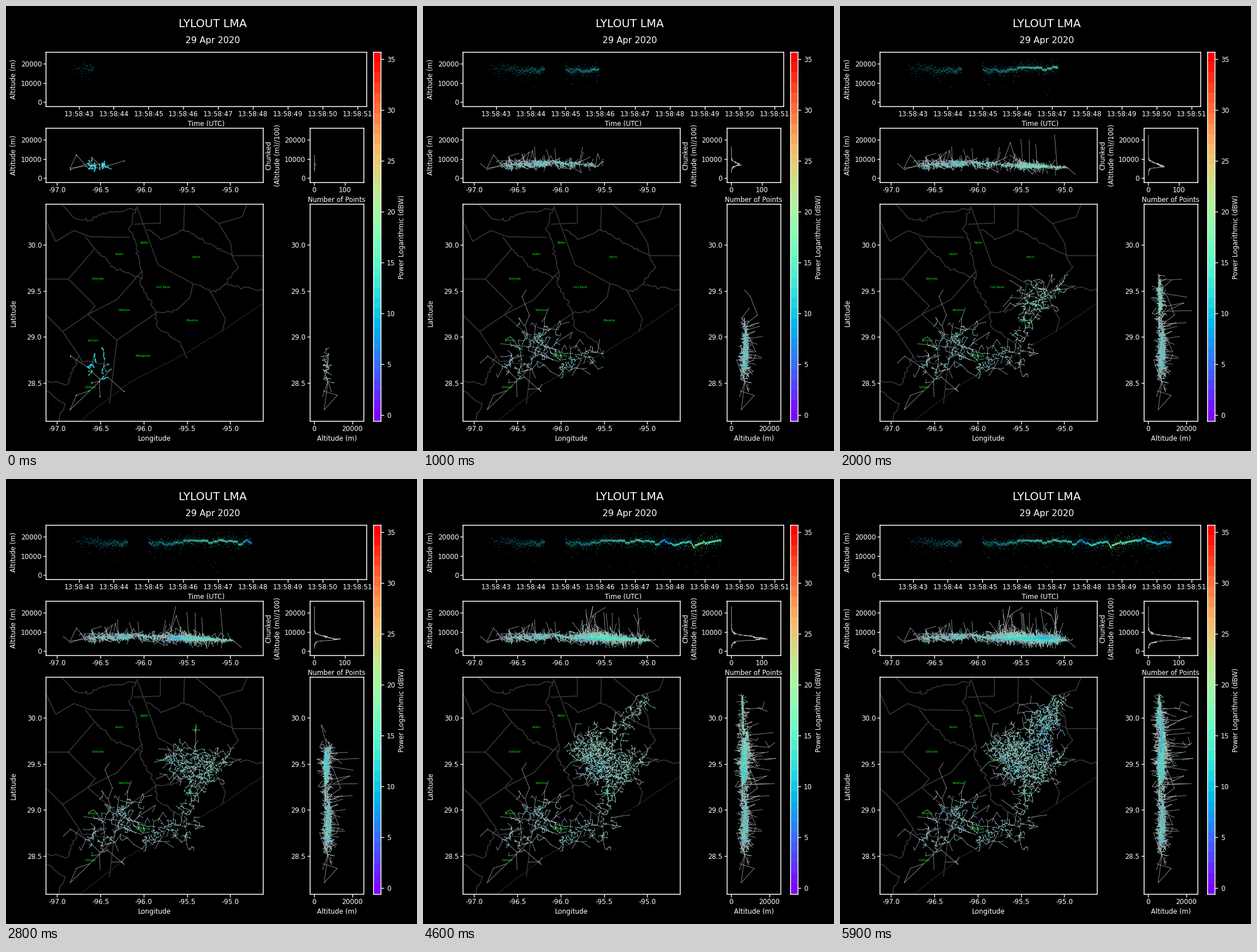
A matplotlib script for the animation above (6000 ms loop, 719 by 779 pixels).

```python
import numpy as np
import matplotlib.pyplot as plt
from matplotlib.animation import FuncAnimation

W, H, DPI = 719, 779, 64
FRAMES, PER_FRAME = 60, 62
N = FRAMES * PER_FRAME
rng = np.random.default_rng(29)


def px(size):
    """Pixels to points."""
    return size * 72 / DPI


TEXT = 35 / 3
plt.style.use("dark_background")
plt.rcParams.update({
    "font.family": "DejaVu Sans",
    "font.size": px(TEXT),
    "axes.linewidth": px(1.5),
    "axes.labelpad": px(3.9),
    "path.simplify": False,
})
for axis in ("xtick", "ytick"):
    plt.rcParams.update({
        f"{axis}.major.size": px(5),
        f"{axis}.major.width": px(1.4),
        f"{axis}.major.pad": px(2.4),
        f"{axis}.labelsize": px(TEXT),
    })

fig = plt.figure(figsize=(W / DPI, H / DPI), dpi=DPI, facecolor="black")


# Stage pixels to data units
def lon(x):
    return -97 + (np.asarray(x) - 89.3) / 151.5


def lat(y):
    return 30 - (np.asarray(y) - 418.5) / 161


def sec(x):
    return 43 + (np.asarray(x) - 127.5) / 60.9


def panel(x0, y0, x1, y1, xlim, ylim):
    ax = fig.add_axes([x0 / W, 1 - y1 / H, (x1 - x0) / W, (y1 - y0) / H],
                      facecolor="black")
    ax.set(xlim=xlim, ylim=ylim)
    return ax


def caption(x, y, text, size=TEXT, **kw):
    fig.text(x / W, 1 - y / H, text, size=px(size), color="white",
             ha="center", linespacing=1.15, **kw)


# Panels
ALT = (-2260, 26165)
LON = lon([70, 450])
LAT = lat([726.5, 347])
time_ax = panel(70, 81, 630.5, 175.5, sec([70, 630.5]), ALT)
lon_ax = panel(70, 214, 450, 308.5, LON, ALT)
count_ax = panel(531.5, 214, 626, 308.5, (-14, 162), ALT)
map_ax = panel(70, 347, 450, 726.5, LON, LAT)
lat_ax = panel(531.5, 347, 626, 726.5, (-2340, 26000), LAT)
bar_ax = panel(642.5, 81, 655.5, 726.5, (0, 1), (-0.6, 35.7))

for ax in (time_ax, lon_ax, count_ax):
    ax.set_yticks([0, 10000, 20000])
for ax in (lon_ax, map_ax):
    ticks = np.arange(-97, -94.9, 0.5)
    ax.set_xticks(ticks, [f"{t:.1f}" for t in ticks])
for ax in (map_ax, lat_ax):
    ticks = np.arange(28.5, 30.1, 0.5)
    ax.set_yticks(ticks, [f"{t:.1f}" for t in ticks])
time_ax.set_xticks(range(43, 52), [f"13:58:{s}" for s in range(43, 52)])
count_ax.set_xticks([0, 100])
lat_ax.set_xticks([0, 20000])

time_ax.set_xlabel("Time (UTC)")
count_ax.set_xlabel("Number of Points")
map_ax.set_xlabel("Longitude")
lat_ax.set_xlabel("Altitude (m)")
caption(361.5, 37, "LYLOUT LMA", TEXT * 5 / 3)
caption(361.5, 64.5, "29 Apr 2020", TEXT * 4 / 3)
for x, y, text in [(13, 128, "Altitude (m)"), (13, 261, "Altitude (m)"),
                   (13, 537, "Latitude"),
                   (467.5, 261.5, "Chunked\n(Altitude (m)//100)"),
                   (692.5, 404, "Power Logarithmic (dBW)")]:
    caption(x, y, text, rotation=90, va="center")

bar_ax.imshow(np.arange(36)[:, None], cmap="rainbow", aspect="auto",
              origin="lower", extent=(0, 1, -0.6, 35.7))
bar_ax.yaxis.tick_right()
bar_ax.tick_params(axis="y", pad=px(5.5))
bar_ax.set_xticks([])
bar_ax.set_yticks(range(0, 36, 5))


# County map
def border(*points, color="#3a3a3a", width=1.5):
    x, y = np.array(points, float).T
    map_ax.plot(lon(x), lat(y), color=color, lw=px(width), zorder=1)


def river(*points, rough=1.3, **style):
    """A border that wiggles between its key points."""
    pts = np.array(points, float)
    run = np.r_[0, np.hypot(*np.diff(pts, axis=0).T).cumsum()]
    at = np.linspace(0, run[-1], int(run[-1] / 4))
    bend = np.column_stack([np.interp(at, run, c) for c in pts.T])
    bend[1:-1] += rng.normal(0, rough, bend[1:-1].shape)
    border(*bend, **style)


border((70, 376), (87, 412), (119, 393), (148, 404), (216, 405))
border((270, 347), (270, 380), (224, 382))
border((229, 351), (266, 453), (327, 486), (322, 510), (299, 532))
border((312, 347), (311, 392))
border((331, 347), (372, 381), (393, 415), (396, 437), (450, 437))
border((372, 381), (413, 369), (422, 347))
border((356, 497), (384, 548), (378, 570))
border((181, 696), (194, 585), (143, 540), (194, 514), (238, 464))
border((194, 585), (263, 537))
border((70, 478), (109, 478), (156, 525), (143, 540), (99, 570), (70, 541))
border((109, 478), (155, 425), (139, 404))
border((99, 570), (127, 611))
river((98, 347), (120, 373), (148, 374), (165, 364), (228, 354))
river((228, 354), (216, 387), (228, 420), (237, 467), (235, 487), (263, 537))
river((299, 532), (263, 537), (263, 560), (305, 590), (317, 617))
river((247, 392), (275, 408), (311, 392), (370, 425), (396, 437), (405, 457),
      (385, 487), (366, 500), (327, 486))
river((385, 487), (450, 499))
river((155, 425), (186, 456), (238, 478))
river((127, 611), (133, 621), (181, 627))
river((127, 611), (108, 662), (70, 656))
river((70, 675), (104, 698), (92, 726))
river((450, 520), (378, 569), (318, 606), (215, 660), (130, 726), rough=0.4,
      color="#252525", width=1.2)

for x, y, name in [(243, 415, "Waller"), (199, 435, "Austin"),
                   (333, 440, "Harris"), (161, 478, "Colorado"),
                   (275, 493, "Fort Bend"), (207, 533, "Wharton"),
                   (326, 551, "Brazoria"), (153, 585.5, "Jackson"),
                   (240, 612.5, "Matagorda"), (148, 668, "Calhoun")]:
    map_ax.text(lon(x), lat(y), name, color="lime", size=px(TEXT * 5 / 12),
                ha="center", va="center", zorder=1.5)

# Flash front on the stage: frame, x, y, radius
ROUTE = np.array([
    (0, 155, 648, 18), (2, 190, 605, 20), (4, 228, 598, 18),
    (6, 185, 568, 20), (8, 250, 620, 11), (11, 308, 615, 14),
    (13, 325, 550, 9), (15, 350, 505, 14), (17, 320, 525, 15),
    (20, 382, 490, 9), (22, 340, 490, 18), (26, 290, 488, 10),
    (30, 320, 522, 18), (33, 272, 475, 11), (36, 300, 452, 14),
    (41, 320, 495, 24), (43, 337, 445, 8), (46, 385, 388, 5),
    (49, 345, 422, 14), (53, 378, 430, 6), (56, 330, 465, 20),
    (59, 362, 470, 7)], float)

# Sources come as short wandering leaders, mixed with lone scattered ones
step = np.arange(N) / PER_FRAME
batch = step.astype(int)
lone = rng.random(N) < 0.27
spots = np.zeros((N, 2))
for i in range(N):
    x, y, radius = (np.interp(batch[i], ROUTE[:, 0], c)
                    for c in ROUTE.T[1:])
    if i % 10 == 0:
        tip = rng.normal((x, y), radius * 0.8)
        heading = rng.uniform(0, 2 * np.pi)
    heading += rng.normal(0, 0.6)
    tip = tip + rng.gamma(2, 1.0) * np.array([np.cos(heading),
                                              np.sin(heading)])
    spots[i] = rng.normal((x, y), radius * 1.3) if lone[i] else tip

# Arrival slows down as a power law, with a pause before second 45
secs = 42.8 + 0.62 * (step + rng.random(N) / PER_FRAME) ** 0.593
secs[secs > 44.4] += 0.6

# Active layer along the time panel: x, altitude, power
LAYER = np.array([
    (130, 7000, 11), (290, 7600, 11), (325, 5800, 14), (380, 6300, 14),
    (411, 7500, 12), (425, 5100, 7), (440, 8200, 13), (468, 6000, 13),
    (474, 9200, 19), (500, 6900, 15), (530, 5500, 12), (555, 7000, 10),
    (578, 5800, 8)], float)
alt, power = (np.interp(secs, sec(LAYER[:, 0]), c) for c in LAYER.T[1:])
burst = (secs * 7).astype(int)
alt += rng.normal(0, 450, burst.max() + 1)[burst]
alt += rng.normal(0, np.where(lone, 2000, 300 + 1000 * np.exp(-step / 6)))
stray = lone & (rng.random(N) < 0.06)
ceiling = np.minimum(15000 + 450 * step, 23700)
alt[stray] = rng.uniform(10000, ceiling[stray])
alt = np.clip(alt, 900 + 900 * rng.random(N), 23800)

power += rng.normal(0, 2.2, N)
colors = plt.get_cmap("rainbow")((power + 0.6) / 36.3)

# Every source branches off its nearest predecessor, sometimes a recent one
place = np.column_stack([spots, alt / 690])
parent = np.zeros(N, int)
for i in range(1, N):
    leap = rng.random() < 0.04 + 0.1 * (batch[i] < 8)
    start = max(0, i - 12) if leap else 0
    gap = ((place[start:i] - place[i]) ** 2).sum(axis=1)
    parent[i] = start + gap.argmin()

lons, lats = lon(spots[:, 0]), lat(spots[:, 1])


def links(v):
    return np.column_stack([v[parent], v, np.full(N, np.nan)]).ravel()


def dots(ax, x, y):
    art = ax.scatter(x, y, c=colors, s=1, linewidths=0, zorder=3)
    return art, np.column_stack([x, y])


webs = []
for ax, x, y in [(map_ax, lons, lats), (lon_ax, lons, alt),
                 (lat_ax, alt, lats)]:
    line, = ax.plot([], [], color="white", alpha=0.65, lw=px(0.75), zorder=2)
    webs.append((line, links(x), links(y)))

clouds = [dots(map_ax, lons, lats), dots(lon_ax, lons, alt),
          dots(lat_ax, alt, lats), dots(time_ax, secs, 24000 - alt)]
profile, = count_ax.plot([], [], color="#e4f2f0", alpha=0.8, lw=px(0.8))
chunk = (alt // 100).astype(int)


def update(frame):
    n = (frame + 1) * PER_FRAME
    for line, x, y in webs:
        line.set_data(x[:3 * n], y[:3 * n])
    big = 0.95 + 1.4 * np.exp(-frame / 1.5)
    for (art, pts), size in zip(clouds, (big, big, 0.85, 0.85)):
        art.set_offsets(pts[:n])
        art.set_sizes([px(size) ** 2])
    level, count = np.unique(chunk[:n], return_counts=True)
    profile.set_data(count, level * 100)
    return [profile]


anim = FuncAnimation(fig, update, frames=FRAMES, interval=100, repeat=True)
plt.show()
```
